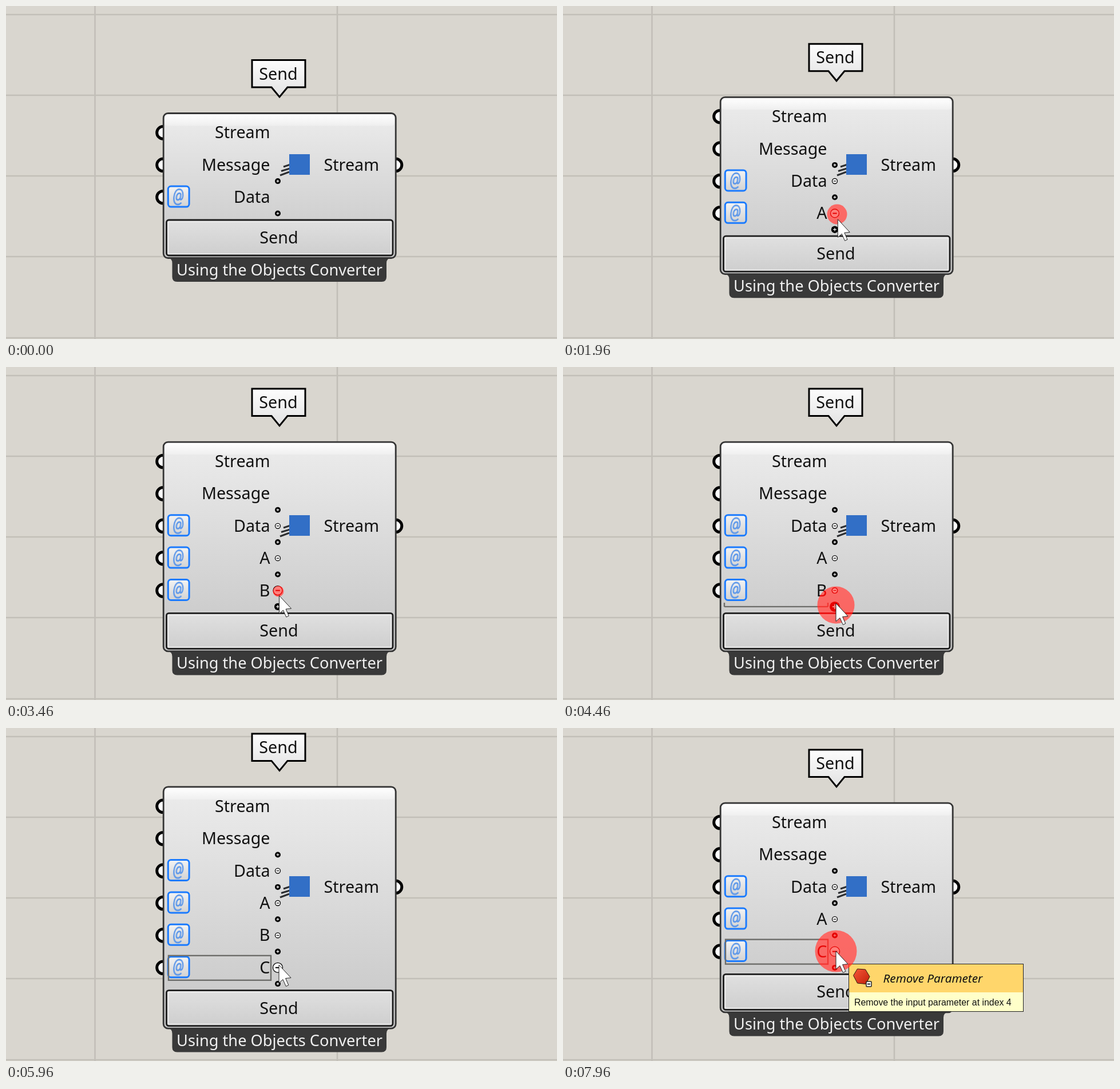
Write an HTML page that moves like this. It is 963 by 582 pixels and loops after 8000 ms.

```html
<!DOCTYPE html>
<html lang="en">
<head>
<meta charset="utf-8">
<title>Adding and removing inputs</title>
<style>
  html, body { margin: 0; width: 100%; height: 100%; overflow: hidden; background: #d9d6cf; }
  svg { display: block; }
  text { font: 28.7px "Noto Sans", "Open Sans", sans-serif; fill: #111; }
  .end { text-anchor: end; }
  .mid { text-anchor: middle; }
  .note { font-size: 27.2px; fill: #f1f1f1; }
  .tip-title { font-size: 20.7px; font-style: italic; }
  .tip-body { font: 15.9px "Liberation Sans", Arial, sans-serif; }
  .grid { stroke: #c2bfb8; stroke-width: 2.6; }
  .mark { fill: none; stroke: #6d6d6a; stroke-width: 2.4; }
  .port { fill: #fff; stroke: #000; stroke-width: 5; }
  .multiply { fill: #ff7f7b; mix-blend-mode: multiply; }
  .screen { fill: #e60000; mix-blend-mode: screen; }
</style>
</head>
<body>
<svg width="963" height="582" viewBox="0 0 963 582">
  <defs>
    <linearGradient id="body" x2="0" y2="1">
      <stop stop-color="#ececec"/><stop offset="1" stop-color="#c6c6c6"/>
    </linearGradient>
    <linearGradient id="gloss" x2="0" y2="1">
      <stop stop-color="#fff" stop-opacity=".95"/><stop offset="1" stop-color="#fff" stop-opacity=".25"/>
    </linearGradient>
    <linearGradient id="label" x2="0" y2="1">
      <stop stop-color="#fdfdfd"/><stop offset="1" stop-color="#e2e2e2"/>
    </linearGradient>
    <linearGradient id="chip" x2="0" y2="1">
      <stop stop-color="#f4f4f4"/><stop offset="1" stop-color="#d2d2d2"/>
    </linearGradient>
    <linearGradient id="button" x2="0" y2="1">
      <stop stop-color="#e0e0e0"/><stop offset="1" stop-color="#cecece"/>
    </linearGradient>
    <linearGradient id="dark" x2="1" y2="1">
      <stop stop-color="#4a4a45"/><stop offset="1" stop-color="#1c1c19"/>
    </linearGradient>
    <linearGradient id="red" x2="1" y2="1">
      <stop stop-color="#f4573a"/><stop offset="1" stop-color="#c41f08"/>
    </linearGradient>
    <filter id="soft"><feGaussianBlur stdDeviation=".6"/></filter>
    <g id="at">
      <rect x="-18.2" y="-18" width="36.8" height="36" rx="5" fill="url(#chip)" stroke="#1b7bff" stroke-width="3"/>
      <path transform="skewX(-6) scale(.88 1.06)" d="M4 -4C1 -7 -4 -5 -4 1C-4 7 2 7 4 1V-5V3C4 7 9 5 8.5 -2C8 -9 4 -12 0 -12C-6 -12 -9 -6 -9 1C-9 9 -5 13 0 13C3 13 5 12 7 10"
        fill="none" stroke="#5a96ea" stroke-width="2.6" filter="url(#soft)"/>
    </g>
    <path id="arrow" d="M0 0V31.5L7 25.5L12.3 37.5L16.8 35.4L11.6 23.5L21 22.6Z" fill="#fff" stroke="#222" stroke-width="1"/>
  </defs>
  <path class="grid" d="M155.5 0V582M579 0V582M0 15H963M0 156H963M0 297H963M0 438H963M0 580H963"/>
  <g id="scene"></g>
</svg>
<script>
const LOOP = 8000, STEP = 56.4, MID = 277.6;
const scene = document.getElementById('scene');

const inputs = [
  [0, 'Stream Message Data'],
  [1660, 'Stream Message Data A'],
  [3020, 'Stream Message Data A B'],
  [4500, 'Stream Message Data A B C'],
  [6920, 'Stream Message Data A C']
].map(([t, names]) => [t, names.split(' ')]);

// time, x, y of the pointer tip
const path = [
  [60, 499, 588], [480, 478, 304], [790, 475, 359], [920, 475, 359], [1000, 479, 364],
  [1290, 479, 364], [1370, 480, 366], [1460, 479, 364], [1720, 479, 364], [2130, 481, 378],
  [2330, 480, 399], [2460, 476, 392], [3080, 476, 392], [3640, 478, 402], [4040, 478, 414],
  [4380, 478, 414], [4460, 477, 413], [4640, 477, 415], [5140, 469, 521], [5210, 469, 521],
  [5290, 475, 500], [5500, 475, 500], [5820, 478, 417], [5960, 477, 414], [6290, 478, 407],
  [6800, 474, 364], [6960, 473, 365], [7150, 473, 365], [7580, 477, 390], [LOOP, 477, 390]
];

// time, x, y of each press
const presses = [[1580, 479, 364], [2920, 476, 392], [4380, 477, 416], [6860, 472.5, 364.5], [7960, 477, 390]];

// from, to, verb, index
const tips = [[2830, 2920, 'Insert', 4], [4380, 4420, 'Insert', 5], [7960, LOOP, 'Remove', 4]];

const lastBefore = (list, t) => list.filter(item => item[0] <= t).pop();
const text = (x, y, s, cls) => `<text x="${x}" y="${y}" class="${cls}">${s}</text>`;

function pointer(t) {
  const i = path.findIndex(p => p[0] > t);
  if (i < 1) return { x: path[0][1], y: path[0][2] };
  const [t0, x0, y0] = path[i - 1], [t1, x1, y1] = path[i];
  const k = (t - t0) / (t1 - t0), e = k * k * (3 - 2 * k);
  return { x: x0 + (x1 - x0) * e, y: y0 + (y1 - y0) * e };
}

function handles(count, rowY) {
  const list = [];
  for (let i = 1; i < count; i++) {
    if (i > 1 && count > 3) list.push({ y: rowY(i) + .2 });
    list.push({ y: rowY(i) + STEP / 2 + .3, plus: true, last: i === count - 1 });
  }
  return list;
}

function handle({ y, plus }, dist) {
  const r = 5 + 4 * Math.min(1, Math.max(0, (24 - dist) / 17));
  const a = r * .46, w = r > 7 ? 2 : 1.2;
  const bars = `M${475 - a} ${y}h${2 * a}` + (plus ? `M475 ${y - a}v${2 * a}` : '');
  return `<circle cx="475" cy="${y}" r="${plus ? r : r - .5}" fill="${plus ? '#000' : '#fff'}" stroke="#000" stroke-width="${plus ? 0 : 1.3}"/>
    <path d="${bars}" stroke="${plus ? '#fff' : '#000'}" stroke-width="${w}"/>`;
}

function hoverMark({ y, plus, last }) {
  if (!plus) return `<rect class="mark" x="284" y="${y - 21}" width="179" height="43"/>`;
  const top = y - 7, tick = last ? 7 : 14;
  return `<path class="mark" d="M282 ${y}H463M282 ${top}v${tick}M463 ${top}v${tick}"/>`;
}

function component(names, p) {
  const n = names.length, d = (n - 3) * STEP / 2;
  const rowY = i => MID + (i - (n - 1) / 2) * STEP;
  const top = 187.5 - d, bottom = 440.5 + d, by = 374 + d;
  const marks = handles(n, rowY).map(h => ({ ...h, dist: Math.hypot(p.x - 475, p.y - h.y) }));
  const port = (x, y) => `<circle class="port" cx="${x}" cy="${y}" r="10.8"/>`;
  return `
    <path d="M430 ${94.5 - d}H523V${142 - d}H492L478 ${159 - d}L464 ${142 - d}H430Z" fill="url(#label)" stroke="#000" stroke-width="3"/>
    ${text(476, 128.5 - d, 'Send', 'mid')}
    ${names.map((_, i) => port(274.5, rowY(i) + .2)).join('')}${port(681, MID + .2)}
    <path d="M282 ${bottom}Q290.5 ${bottom} 290.5 ${bottom + 9}V${bottom + 33}q0 8.5 8.5 8.5H656.5q8.5 0 8.5 -8.5V${bottom + 9}Q665 ${bottom} 674 ${bottom}Z" fill="#393939"/>
    <rect x="275.2" y="${top}" width="406" height="${bottom - top}" rx="8" fill="url(#body)" stroke="#353535" stroke-width="2.8"/>
    <rect x="277.5" y="${top + 2}" width="401.5" height="20" rx="5" fill="url(#gloss)"/>
    <rect x="280.5" y="${by}" width="395.5" height="62" rx="4" fill="url(#button)" stroke="#1d1d1d" stroke-width="2.8"/>
    <rect x="283.5" y="${by + 3}" width="389.5" height="56" rx="2" fill="none" stroke="#f2f2f2" stroke-opacity=".65" stroke-width="2"/>
    ${text(477, by + 41, 'Send', 'mid')}
    ${text(478, bottom + 30.5, 'Using the Objects Converter', 'mid note')}
    ${names.map((s, i) => text(461.5, rowY(i) + 10.2, s, 'end')
      + (i > 1 ? `<use href="#at" x="301.5" y="${rowY(i) - .9}"/>` : '')).join('')}
    ${text(555.5, MID + 10.2, 'Stream', '')}
    <path d="M485 281L497 277M481 288.500L496 284M479 296L495 290" stroke="#2c2e31" stroke-width="3" filter="url(#soft)"/>
    <rect x="495" y="259" width="36" height="36" fill="#326fc6"/>
    ${marks.filter(m => m.dist < 9).map(hoverMark).join('')}
    ${marks.map(m => handle(m, m.dist)).join('')}`;
}

function tooltip([, , verb, index], p) {
  const remove = verb === 'Remove', w = remove ? 305 : 280;
  return `<g transform="translate(${Math.round(p.x + 22) + .5} ${Math.round(p.y + 22) + .5})">
    <rect width="${w}" height="83" fill="#ffffc9"/>
    <rect width="${w}" height="49.5" fill="#ffd66b"/>
    <rect width="${w}" height="83" fill="none" stroke="#222"/>
    <path d="M8 20L15 8.500L29 9.500L36.500 22L30 35L15 33.500Z" fill="url(#${remove ? 'red' : 'dark'})" stroke="#2a1a12"/>
    <rect x="30.5" y="30.5" width="9" height="9" rx="1" fill="#fff" stroke="#222" stroke-width="1.5"/>
    <path d="M32.500 35h5${remove ? '' : 'M35 32.500v5'}" stroke="#222" stroke-width="2"/>
    ${text(60, 32.5, verb + ' Parameter', 'tip-title')}
    ${text(9.5, 72, `${verb} ${remove ? 'the' : 'an'} input parameter at index ${index}`, 'tip-body')}
  </g>`;
}

function ripple(t) {
  const press = lastBefore(presses, t);
  const r = press ? 36.5 - .05 * (t - press[0]) : 0;
  if (r <= 0) return '';
  return ['multiply', 'screen'].map(c => `<circle class="${c}" cx="${press[1]}" cy="${press[2]}" r="${r}"/>`).join('');
}

function draw(t) {
  const p = pointer(t), tip = tips.find(([a, b]) => t >= a && t < b);
  scene.innerHTML = component(lastBefore(inputs, t)[1], p)
    + (tip ? tooltip(tip, p) : '')
    + ripple(t)
    + (t >= 80 ? `<use href="#arrow" x="${p.x}" y="${p.y}"/>` : '');
}

let start;
function frame(now) {
  start ??= now;
  draw((now - start) % LOOP);
  requestAnimationFrame(frame);
}
draw(0);
requestAnimationFrame(frame);
</script>
</body>
</html>
```
